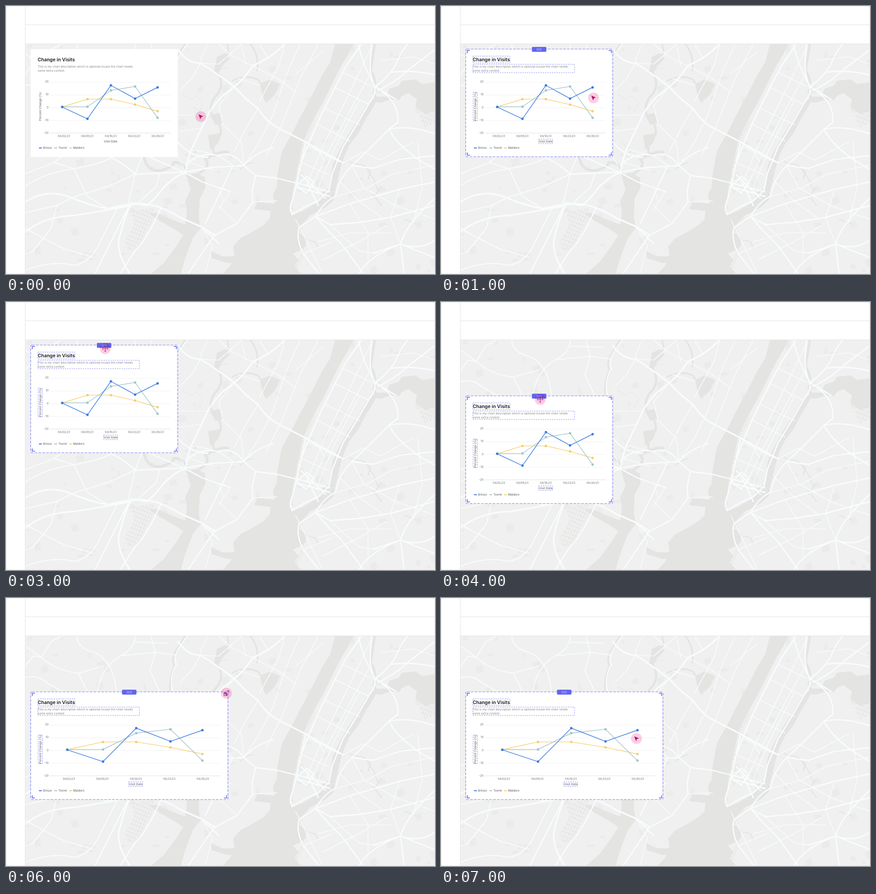
Write an HTML page that moves like this. It is 948 by 591 pixels and loops after 8000 ms.

```html
<!DOCTYPE html>
<html lang="en">
<head>
<meta charset="utf-8">
<title>Chart card on a map</title>
<style>
  html, body { margin: 0; width: 100%; height: 100%; overflow: hidden; background: #f4f4f4; }
  svg { display: block; }
  text { font-family: Inter, Roboto, sans-serif; font-size: 6.3px; fill: #6f7175; }
  .line { fill: none; stroke-linecap: round; stroke-linejoin: round; }
  .water { fill: #e4e4e2; }
  .river { stroke: #e4e4e2; }
  .road { stroke: #f8fcfc; }
  .dash { fill: none; stroke: #8f91f4; stroke-dasharray: 3 2; }
  .hover { stroke-dasharray: none; stroke: #6466ee; }
  .halo { fill: #fdcde6; mix-blend-mode: multiply; }
  .icon { fill: none; stroke: #ad1561; stroke-width: .9; stroke-linejoin: round; stroke-linecap: round; }
</style>
</head>
<body>
<svg width="948" height="591" viewBox="0 0 948 591">
  <defs>
    <clipPath id="frame"><rect x=".5" y=".5" width="947" height="590" rx="6"/></clipPath>
    <pattern id="streets" width="9" height="6" patternUnits="userSpaceOnUse" patternTransform="rotate(-68)">
      <path d="M0 1H9M2 0V6" stroke="#dfdfdd" stroke-width=".9"/>
    </pattern>
  </defs>
  <g clip-path="url(#frame)">
    <rect width="948" height="591" fill="#fff"/>
    <svg x="43" y="84" width="905" height="507" viewBox="43 84 905 507">
      <rect x="43" y="84" width="905" height="507" fill="#f0f0f0"/>
      <g id="parks" fill="#ebebea"></g>

      <g class="water">
        <path d="M727 83L768 83 757 105 742 130 724 165 702 210 682 245 668 272 656 300 647 340 640 375 634 410 629 450 633 461
          655 452 675 441 692 430 698 412 714 402 718 378 722 350 737 318 757 283 775 257 795 222 808 205 822 203 810 225 795 250
          778 282 760 305 748 330 740 355 733 385 728 405 724 428 705 445 690 452 672 462 655 478 648 500 664 512 662 530 648 540
          634 546 646 560 638 574 652 591L478 591 496 572 505 550 502 530 518 512 545 498 568 484 582 470 585 452 548 448 556 432
          594 436 590 415 598 400 600 372 604 350 610 320 637 272 650 245 672 205 700 150 716 125Z"/>
        <path d="M812 190L820 200 840 200 848 182 868 176 875 165 905 162 920 172 948 168 948 232 925 238 905 222 908 206 890 192
          875 198 868 208 850 206 830 213 815 212Z"/>
        <path d="M398 372L420 368 440 378 441 400 428 425 426 465 430 490 414 510 402 540 394 562 386 591 320 591 350 565 376 530
          392 505 372 492 330 468 318 458 330 456 396 482 400 455 396 430 408 405Z"/>
        <path d="M452 540L478 552 505 552 516 568 486 566 455 556ZM446 285L476 280 470 300 452 318ZM452 240L472 236 478 258 462 262Z
          M466 112L484 104 494 116 480 130 468 150 460 144ZM562 172L582 162 606 172 594 196 574 214 566 194Z"/>
      </g>
      <g class="line river">
        <path stroke-width="6" d="M305 333Q312 368 345 362Q372 354 370 345Q395 342 402 375M425 370Q455 352 440 338Q470 320 490 322"/>
        <path stroke-width="5" d="M462 330Q450 305 474 284Q478 260 456 246Q445 215 468 194Q482 172 470 150M812 192Q822 168 806 142L815 83"/>
        <path stroke-width="3.5" d="M362 207Q362 170 372 150Q364 132 378 112L396 83M470 130Q500 110 488 84M500 165Q530 150 556 162Q570 176 578 206M540 84Q560 110 555 142"/>
        <path stroke-width="2.2" d="M758 344L786 350 806 366 800 382M792 352L814 384 822 408 812 424M822 408L830 398M810 415L830 440M668 516L684 520 690 534M518 360L530 350 545 345M880 470L905 480"/>
        <path stroke-width="1" d="M390 196L410 206 420 198 436 214 428 232 414 222 420 240M400 300L420 322 395 328 425 336 412 310M560 186L600 176M570 200L596 186M572 168L588 206M470 140L492 136"/>
        <path stroke-width="7" stroke-dasharray="1.6 4" stroke-linecap="butt" d="M637 394L646 345 660 297 682 250M606 340L634 284M650 484L656 545 640 580M512 524L500 575"/>
      </g>
      <path d="M276 452L326 446 324 470 292 534 270 542 262 520 284 480Z" fill="url(#streets)"/>
      <path d="M912 242L940 228 948 236 948 258 926 268Z" fill="url(#streets)"/>

      <g class="line road">
        <path stroke-width="3.6" d="M43 432Q90 402 140 421Q185 440 225 447Q260 437 300 436Q340 438 384 466L432 487 462 506
          M43 498Q85 464 150 462Q240 448 275 440M274 591Q240 540 252 505Q262 465 275 440
          M275 434L312 440Q335 420 348 400Q380 370 397 368Q400 340 410 316L446 240Q465 206 502 180
          M502 180Q528 160 545 132Q590 112 616 83M380 96Q400 126 430 126Q468 150 502 176L532 206 557 226Q576 256 600 268L662 300 745 346"/>
        <path stroke-width="2.8" d="M285 371L398 366 455 356 526 352 552 374 600 380 640 390 664 396 716 410M397 368L434 388 496 409
          M526 352Q548 325 590 312M526 352Q500 318 470 330Q430 320 397 350M500 354Q470 420 440 480M552 374Q540 410 546 432L510 480 460 506Q430 550 402 591
          M432 487L470 524M343 443Q315 510 285 540L252 591M270 445L196 591M230 333Q265 350 285 371M397 368L310 330M380 300Q402 330 446 334"/>
        <path stroke-width="3" d="M632 458Q624 446 634 425L650 352 666 310 692 250 724 186 752 132 786 83
          M632 460L664 441 690 430 714 406 721 370 745 310 776 260 802 215Q822 190 812 170Q800 150 808 83
          M640 398L664 376 680 388 664 412 640 398L716 420M652 372L706 424M666 390L690 440M662 300L642 392"/>
        <path stroke-width="1.7" d="M664 396L700 310 748 214 806 94M676 398L712 322 768 216 800 160M690 400L724 318 780 210
          M652 345L712 372M666 308L738 344M690 262L760 298M706 226L782 262M728 180L800 216M744 146L806 176M662 300L690 318 704 344"/>
        <path stroke-width="2.9" d="M684 464Q704 430 728 420Q736 380 764 352Q802 318 846 272Q890 262 948 282M684 464L716 482 782 477 850 466 948 440
          M684 464L648 488Q640 510 656 545L692 591M684 464L760 436 870 404 948 388M684 464L712 496 744 528 790 591
          M780 591Q800 552 872 525Q915 540 948 516M872 525Q884 480 948 424M872 525L880 591M812 545L872 525 948 555"/>
        <path stroke-width="2.9" d="M816 178L862 206M816 178Q846 156 862 128Q870 105 888 83M850 146Q900 140 948 152M816 178Q790 135 778 83
          M816 178Q870 210 866 256L846 272M822 186Q858 170 890 140L948 96M764 352L812 358 870 338 948 330M846 272Q870 318 948 360"/>
        <path stroke-width="1.6" d="M728 420L800 400 850 372 948 350M745 346L790 322 826 340 900 300M764 352L790 400 860 440 948 470M716 482L780 540 812 545
          M690 520L760 500 850 500M700 560L780 520 840 484M760 436L800 500 800 560M870 404L850 466 872 525M830 120L900 112 948 128
          M640 470L700 591M660 545L720 520M736 385L780 430 830 466M910 300L920 400 900 480"/>
        <path stroke-width="2.2" d="M43 106L78 131 100 96 122 84M156 83Q158 112 196 120Q238 140 244 207M286 83Q284 112 254 127Q212 150 202 207
          M43 176Q70 168 92 188L126 207M78 131Q110 160 160 166L215 150M320 83L330 120 318 160 340 207M254 127L330 120 376 126
          M368 207Q360 170 377 146Q365 126 402 83M43 150L60 128 78 131M160 166L180 207M284 97L356 100"/>
        <path stroke-width="2.2" d="M43 396Q92 366 150 359Q205 350 236 333M43 370L106 345 122 333M150 359L180 420 225 447M285 371L225 398 150 421
          M43 456L112 440 150 421M43 490Q70 506 130 536L196 555M43 583Q100 560 150 572Q190 566 212 512L246 446M285 371L270 436M106 345L150 359
          M112 440L100 490 60 540 43 548M300 334L285 371M340 370L330 400 290 436"/>
        <path stroke-width="1.7" d="M446 84Q430 110 430 126L410 160 384 186M502 180L470 220 480 262 520 300 526 352M557 226L530 270 505 320
          M590 240L560 300 526 352M545 132L600 160 640 190M616 83L604 130 560 210M650 84L620 150 590 240M690 84L650 160 610 260 575 330
          M470 84L500 110 545 132M430 126L470 128 520 84M560 84L580 116M380 240L446 240M384 276L430 270M410 316L470 330 505 354M512 160L560 175"/>
        <path stroke-width="1.5" d="M496 409L470 450M546 432L600 430M470 440L510 480M434 388L470 400 480 430M432 487L456 530 440 591M520 84L530 130M397 368L380 330M404 345L460 362M640 150L700 100"/>
      </g>
    </svg>
    <path d="M42.5 0V591M43 41.5H948M43 83.5H948" stroke="#e3e3e3"/>
  </g>
  <rect x=".5" y=".5" width="947" height="590" rx="6" fill="none" stroke="#ececec"/>
  <g id="card"></g>
  <g id="cursor"></g>
</svg>
<script>
const $ = id => document.getElementById(id);
const days = ['04/02/23', '04/09/23', '04/16/23', '04/23/23', '04/30/23'];
const pointX = [124.3, 180, 231.8, 285.2, 335];
const series = [
  { name: 'Maldorn', color: '#f6cf70', keyX: 139, y: [222.5, 205.4, 205.4, 217.4, 232] },
  { name: 'Tovrel', color: '#a2c6c8', keyX: 106.5, y: [222.3, 222, 186, 177.4, 246.5] },
  { name: 'Brinzo', color: '#3d7be2', keyX: 72.5, y: [222.8, 248.8, 175, 204.2, 179.5] },
];
const icons = {
  arrow: '<path d="M-5-5L5.5-.8.8 1-1 5.8Z" fill="#ad1561"/>',
  text: '<path class="icon" d="M-2-5Q0-5 0-3.5Q0-5 2-5M0-3.5V3.5M-2 5Q0 5 0 3.5Q0 5 2 5"/>',
  move: '<path class="icon" d="M-6.5 0H6.5M0-6.5V6.5M-4.5-2L-6.5 0-4.5 2M4.5-2L6.5 0 4.5 2M-2-4.5L0-6.5 2-4.5M-2 4.5L0 6.5 2 4.5"/>',
  resize: '<path class="icon" d="M-3 3L5.5-5.5M1.5-5.5H5.5V-1.5M-1-1.5H-5.5V5.5H1.5V1M-3 0V3H0"/>',
};
// One scene per second: card offset, extra width, cursor position and icon.
const scenes = [
  { dy: 0, grow: 0, x: 430.5, y: 244, icon: 'arrow' },
  { dy: 0, grow: 0, x: 337, y: 202.5, icon: 'arrow', selected: true },
  { dy: 0, grow: 0, x: 122, y: 118.7, icon: 'text', selected: true, titleHover: true },
  { dy: 0, grow: 0, x: 219.3, y: 103, icon: 'move', selected: true },
  { dy: 112, grow: 0, x: 219.3, y: 215, icon: 'move', selected: true },
  { dy: 112, grow: 0, x: 376, y: 210, icon: 'resize', selected: true },
  { dy: 112, grow: 111, x: 487, y: 210, icon: 'resize', selected: true },
  { dy: 112, grow: 111, x: 432, y: 310, icon: 'arrow', selected: true },
];

const label = (x, y, text, attrs = '') => `<text x="${x}" y="${y}" ${attrs}>${text}</text>`;
const box = (x, y, w, h, cls = '') => `<rect class="dash ${cls}" x="${x}" y="${y}" width="${w}" height="${h}"/>`;

function chart(grow) {
  const left = 97.6, width = 266 + grow;
  const scaleX = x => left + (x - left) * width / 266;
  let out = '';
  for (let i = 0; i < 5; i++) {
    const y = 168.5 + i * 27.9;
    out += `<path d="M${left} ${y}H${left + width}" stroke="${i < 4 ? '#f1f1f1' : '#dedfe0'}"/>`;
    out += label(94, 169.2 + i * 28.25, 20 - i * 10, 'text-anchor="end"');
    out += label(102 + (i + .5) * (51.8 + grow / 5), 288.8, days[i], 'text-anchor="middle" style="font-size:6.1px"');
  }
  for (const { name, color, keyX, y } of series) {
    const points = y.map((v, i) => [scaleX(pointX[i]), v]);
    out += `<polyline class="line" points="${points.join(' ')}" stroke="${color}" stroke-width="1.4"/>`;
    out += points.map(([cx, cy]) => `<circle cx="${cx}" cy="${cy}" r="2.7" fill="${color}"/>`).join('');
    out += `<rect x="${keyX}" y="312" width="7" height="2" rx="1" fill="${color}"/>`;
    out += label(keyX + 9.5, 315.4, name, 'font-weight="500"');
  }
  return out;
}

function selection(grow, titleHover) {
  const right = 379.5 + grow, mid = 216.8 + grow / 2;
  let out = box(70.5, 110.5, 82, 15, titleHover ? 'hover' : '') + box(70.5, 128.5, 224.5, 18.5)
    + box(71, 190, 9.5, 63.5) + box(215.5 + grow / 2, 293.5, 31, 10);
  out += `<rect x="54.5" y="95" width="${right - 54.5}" height="237.5" rx="3" fill="none" stroke="#7f82f3" stroke-width="1.2" stroke-dasharray="6 2.5"/>`;
  out += `<path d="M58 104V98H64M${right - 9} 98h6v6M58 323V329H64M${right - 9} 329h6v-6" fill="none" stroke="#5a5cea" stroke-width="1.6"/>`;
  out += `<rect x="${mid - 16}" y="90.3" width="32" height="10.8" rx="2" fill="#6265ee"/>`;
  for (let i = 0; i < 8; i++)
    out += `<circle cx="${mid - 4.5 + i % 4 * 3}" cy="${i < 4 ? 94.5 : 97.3}" r=".75" fill="#fff"/>`;
  return out;
}

function card({ grow, selected, titleHover }) {
  return `<rect x="54.5" y="95" width="${325 + grow}" height="238" rx="3" fill="#fff"/>`
    + label(70, 122.3, 'Change in Visits', 'style="font-size:10.5px;font-weight:600;fill:#17181a"')
    + ['This is my chart description which is optional incase the chart needs', 'some extra context.']
      .map((row, i) => label(70, 136 + i * 9, row, 'style="font-size:6.5px;fill:#85878a"')).join('')
    + chart(grow)
    + label(0, 2.3, 'Percent Change (%)', 'transform="translate(75.7 221.7) rotate(-90)" text-anchor="middle" style="font-size:6.5px;font-weight:500"')
    + label(231.3 + grow / 2, 301.2, 'Visit Date', 'text-anchor="middle" style="font-size:6.6px;font-weight:500"')
    + (selected ? selection(grow, titleHover) : '');
}

const cursor = ({ x, y, icon }) =>
  `<circle class="halo" cx="${x}" cy="${y}" r="12"/><g transform="translate(${x} ${y})">${icons[icon]}</g>`;

function scatterParks() {
  let seed = 7, out = '';
  const random = () => (seed = seed * 16807 % 2147483647) / 2147483647;
  for (let i = 0; i < 110; i++) {
    const w = 4 + random() * 14, h = 4 + random() * 12;
    out += `<path d="M${43 + random() * 900} ${84 + random() * 500}l${w} ${-h / 3} ${w / 4} ${h} ${-w} ${h / 3}Z"/>`;
  }
  $('parks').innerHTML = out;
}

let shown = -1;
function tick() {
  const step = Math.floor(performance.now() / 1000) % scenes.length;
  if (step !== shown) {
    const scene = scenes[shown = step];
    $('card').setAttribute('transform', `translate(0 ${scene.dy})`);
    $('card').innerHTML = card(scene);
    $('cursor').innerHTML = cursor(scene);
  }
  requestAnimationFrame(tick);
}
scatterParks();
tick();
</script>
</body>
</html>
```
